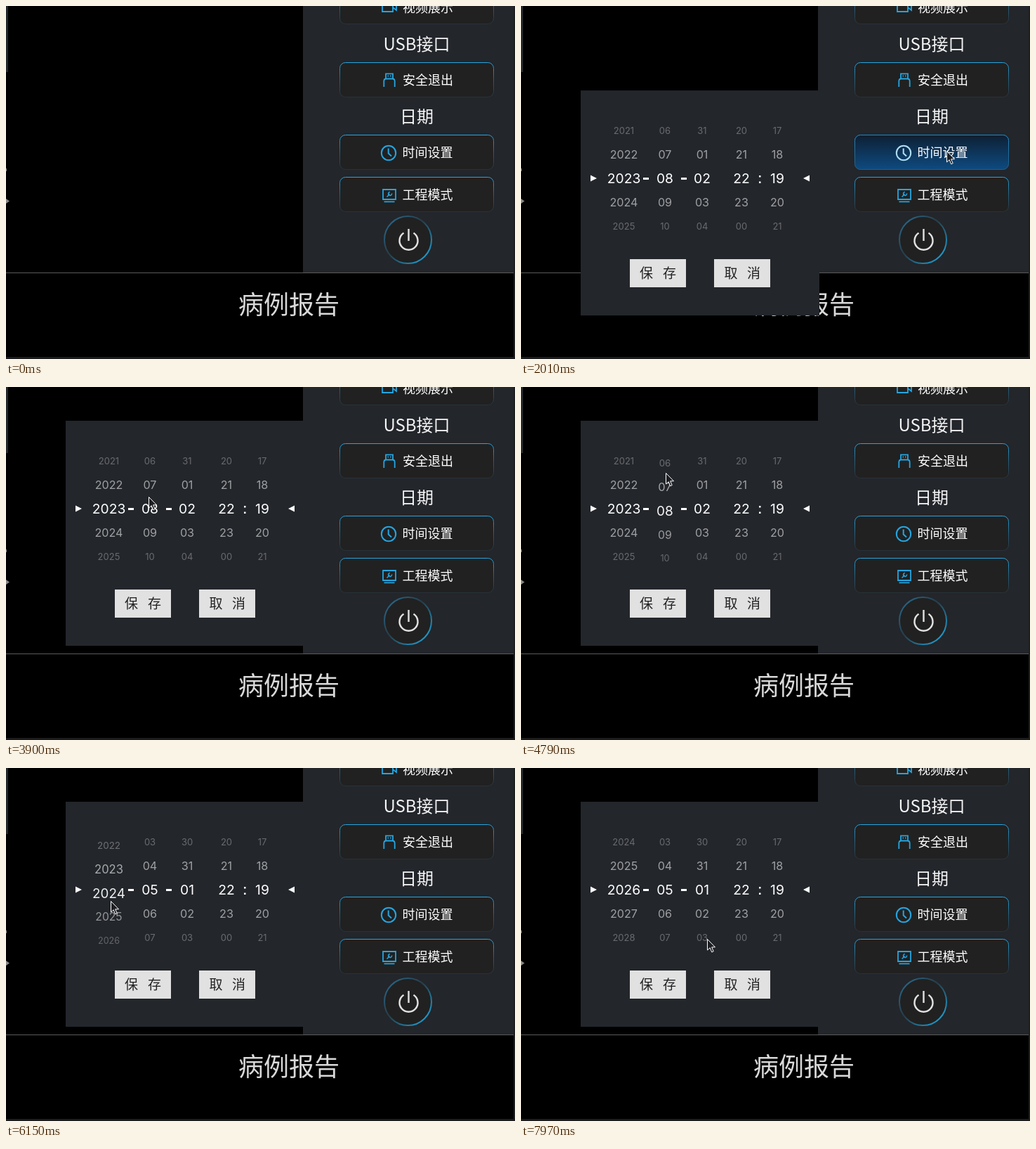
Animation, 725 px wide and 502 px high, one loop 8 s. Source, as an HTML page:

```html
<!DOCTYPE html>
<html lang="zh-CN">
<head>
<meta charset="utf-8">
<style>
html, body { margin: 0; width: 100%; height: 100%; overflow: hidden; background: #000; }
svg { display: block; width: 725px; height: 502px; }
text { font-family: "Noto Sans CJK SC", "Noto Sans CJK JP", sans-serif; font-size: 18px; fill: #fff; white-space: pre; }
.heading { font-size: 24px; text-anchor: middle; fill: #f4f4f4; }
.title { font-size: 36px; fill: #d9d9d9; }
.action { font-size: 19px; fill: #222; }
.wheel { font-family: Inter, "Noto Sans", sans-serif; text-anchor: middle; }
.icon { fill: none; stroke: #25a5e0; stroke-width: 1.8; }
</style>
</head>
<body>
<svg viewBox="0 0 725 502">
  <defs>
    <linearGradient id="edge" x2="0" y2="1">
      <stop stop-color="#25a5e0"/>
      <stop offset=".5" stop-color="#25607c"/>
      <stop offset="1" stop-color="#27333a"/>
    </linearGradient>
    <linearGradient id="pressed" x2="0" y2="1">
      <stop stop-color="#03203f"/>
      <stop offset="1" stop-color="#0562b4"/>
    </linearGradient>
    <linearGradient id="ring" x2="1" y2="1">
      <stop stop-color="#2a7299"/>
      <stop offset=".45" stop-color="#263d49"/>
      <stop offset=".9" stop-color="#1f9ed2"/>
    </linearGradient>
    <rect id="button" x="475.5" y=".5" width="219" height="49" rx="8" fill="#212121" stroke="url(#edge)"/>
    <g id="clock" fill="none" stroke-width="2">
      <circle cx="545" cy="209" r="10.2"/>
      <path d="M544.7 202.5V209.5L549 213.5"/>
    </g>
  </defs>

  <rect width="725" height="502"/>
  <rect width="3" height="94" fill="#23262b"/>
  <path d="M0 231h1v4h-1zM0 274l5 3.5-5 3.5z" fill="#8a8a8a"/>
  <rect x="423" width="300" height="379" fill="#23262b"/>
  <rect y="379" width="723" height="1" fill="#5a5a5a"/>
  <rect x="723" width="2" height="502" fill="#1e1e1e"/>
  <rect y="499" width="725" height="3" fill="#1c1c1c"/>

  <use href="#button" y="-24"/>
  <use href="#button" y="80"/>
  <use href="#button" y="183"/>
  <use href="#button" y="243"/>

  <g class="icon">
    <path d="M536 -4V8H551V-4M551 2L556 6V-4"/>
    <path d="M541 103V96.3H551V103M538.3 115V107Q538.3 103.5 541.5 103.5H550.5Q553.7 103.5 553.7 107V115M543.5 99.5H545M547 99.5H548.5"/>
    <path d="M537 261H555V275H537ZM538.5 278.3H553.5"/>
    <path d="M542.5 271.5L546.5 267.5M549.5 266.5A2.5 2.5 0 1 1 546.8 264.5" stroke-width="1.5"/>
    <use href="#clock"/>
  </g>

  <g id="hover">
    <rect x="475.5" y="183.5" width="219" height="49" rx="8" fill="url(#pressed)" stroke="#1c78b8"/>
    <use href="#clock" stroke="#fff"/>
  </g>

  <text x="565" y="8.5">视频展示</text>
  <text class="heading" x="585" y="62.5">USB接口</text>
  <text x="565" y="111.5">安全退出</text>
  <text class="heading" x="585" y="166">日期</text>
  <text x="564.5" y="214.5">时间设置</text>
  <text x="564.5" y="274.5">工程模式</text>
  <text class="title" x="331" y="438">病例报告</text>

  <circle cx="572.5" cy="332.5" r="33.5" fill="#212121" stroke="url(#ring)" stroke-width="2"/>
  <path d="M566.5 322.8A13 13 0 1 0 580.5 322.8M573.5 317V334" fill="none" stroke="#e2e2e2" stroke-width="2.4"/>

  <g id="dialog">
    <rect x="85" y="48" width="340" height="320" fill="#23262b"/>
    <path d="M99 168.5L108 173L99 177.5ZM411 168.5L402 173L411 177.5ZM174 172h8v3h-8ZM228 172h8v3h-8ZM339 169h2.500v2.500h-2.500ZM339 177.500h2.500v2.500h-2.500Z" fill="#fff"/>
    <g id="wheels"></g>
    <path d="M155 288h80v40h-80ZM275 288h80v40h-80Z" fill="#e1e1e1"/>
    <text class="action" x="169 202" y="315">保存</text>
    <text class="action" x="289.5 322" y="315">取消</text>
  </g>

  <path id="cursor" d="M.5 .5V16L4.2 12.7L6.7 18.8L9.2 17.7L6.7 11.8H11.5Z" fill="#1c1e22" stroke="#fff"/>
</svg>

<script>
const LOOP = 8000, ROW = 34, MIDDLE = 173;
const byId = id => document.getElementById(id);
const hover = byId('hover'), dialog = byId('dialog'), cursor = byId('cursor');

const progress = (t, start, end) => Math.min(1, Math.max(0, (t - start) / (end - start)));
const ease = k => k * k * (3 - 2 * k);
const easeOutBack = k => 1 + 2 * (k - 1) ** 3 + (k - 1) ** 2;
const wrap = (value, first, count) => first + ((value - first) % count + count) % count;

// Pointer moves; bow bends the path downwards
const moves = [
  { start: 260, end: 820, x: 606, y: 206 },
  { start: 2800, end: 3420, x: 183, y: 188, bow: 36 },
  { start: 3550, end: 3900, x: 203, y: 156 },
  { start: 3900, end: 4390, x: 206, y: 111 },
  { start: 4640, end: 5490, x: 204, y: 244 },
  { start: 5490, end: 5840, x: 150, y: 232 },
  { start: 5860, end: 6620, x: 147, y: 102 },
  { start: 6620, end: 7040, x: 278, y: 155 },
  { start: 7200, end: 7770, x: 265, y: 243 }
];

function pointerAt(t) {
  let x = 693, y = 465;
  for (const move of moves) {
    const k = ease(progress(t, move.start, move.end));
    x += (move.x - x) * k;
    y += (move.y - y) * k + (move.bow || 0) * Math.sin(Math.PI * k);
  }
  return [Math.round(x), Math.round(y)];
}

function makeWheel(x) {
  return Array.from({ length: 7 }, () => {
    const item = document.createElementNS('http://www.w3.org/2000/svg', 'text');
    item.setAttribute('class', 'wheel');
    item.setAttribute('x', x);
    return byId('wheels').appendChild(item);
  });
}
const [years, months, days, hours, minutes] = [146.5, 205, 258, 314, 365].map(makeWheel);

function drawWheel(items, position, first, count) {
  items.forEach((item, i) => {
    const index = Math.round(position) + i - 3;
    const offset = index - position, distance = Math.abs(offset);
    const size = 19.3 - 3.15 * distance;
    item.textContent = String(wrap(index, first, count)).padStart(2, '0');
    item.setAttribute('y', MIDDLE + ROW * offset + size * .364);
    item.style.fontSize = size + 'px';
    item.style.opacity = distance > 2.5 ? 0 : .56 ** distance;
  });
}

function draw(t) {
  cursor.style.display = t < 260 ? 'none' : '';
  cursor.setAttribute('transform', `translate(${pointerAt(t)})`);
  hover.style.opacity = progress(t, 1480, 1750) - progress(t, 1940, 2140);
  dialog.style.display = t < 2010 ? 'none' : '';
  dialog.setAttribute('transform', `translate(0 ${73 * (1 - easeOutBack(progress(t, 2010, 2340)))})`);

  const month = 8 - 3 * ease(progress(t, 4710, 5530));
  const shownMonth = Math.round(month);
  drawWheel(years, 2023 + 3 * ease(progress(t, 5860, 6683)), 2000, 100);
  drawWheel(months, month, 1, 12);
  drawWheel(days, shownMonth > 6 ? 2 : 1, 1, shownMonth === 6 ? 30 : 31);
  drawWheel(hours, 22, 0, 24);
  drawWheel(minutes, 19, 0, 60);
}

const origin = performance.now();
function tick() {
  draw((performance.now() - origin) % LOOP);
  requestAnimationFrame(tick);
}
tick();
</script>
</body>
</html>
```
